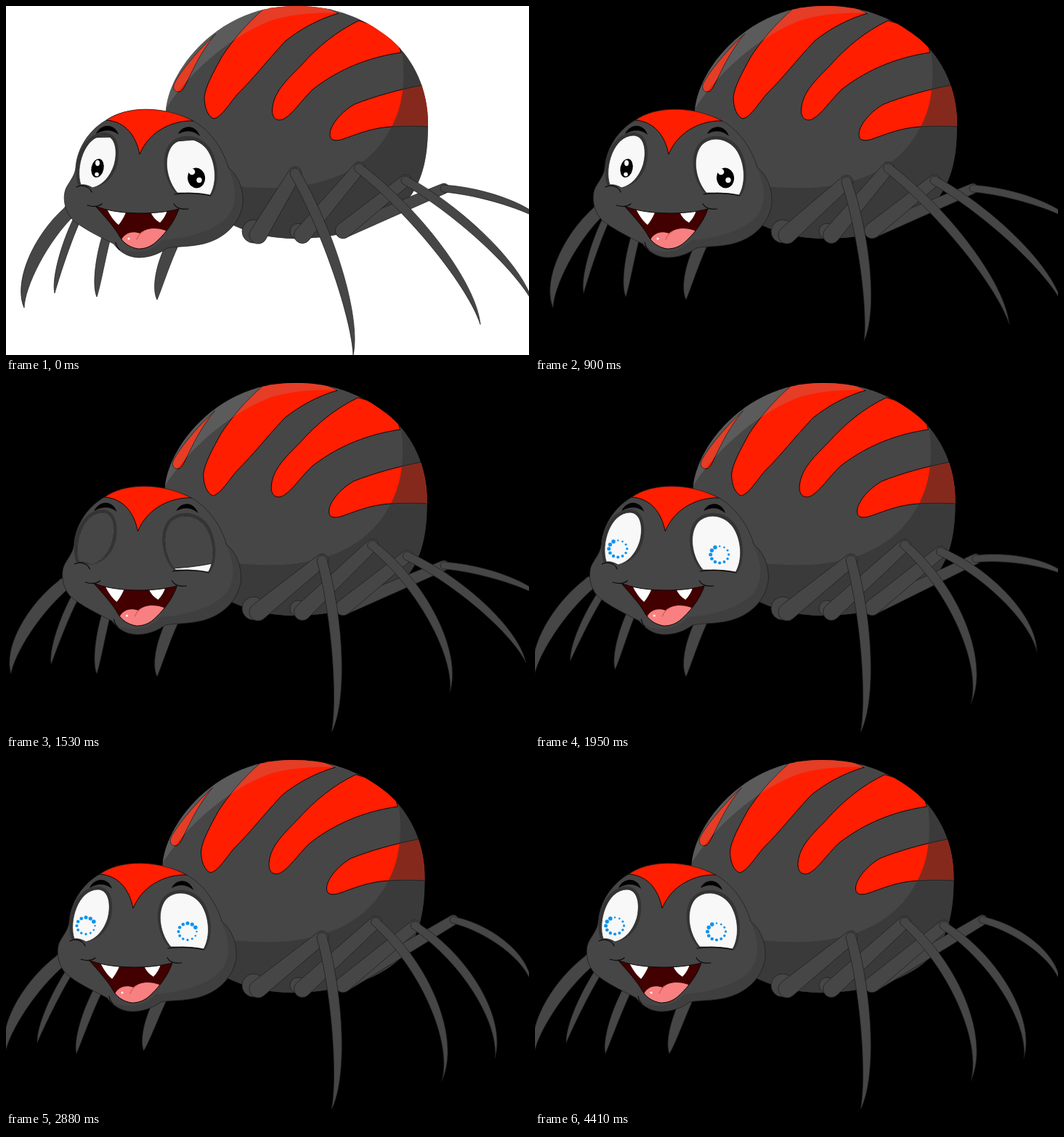
Animation of 720 by 480 pixels, one loop 4.44 s. Source, as an HTML page:

```html
<!DOCTYPE html>
<html lang="en">
<head>
<meta charset="utf-8">
<title>Spider</title>
<style>
html, body { margin: 0; width: 100%; height: 100%; overflow: hidden; background: #000; }
svg { display: block; width: 720px; height: 480px; }
.skin { fill: #464646; }
.ink { stroke: #0a0a0a; stroke-width: 1; stroke-linejoin: round; }
.thin { stroke: #1c1c1c; stroke-width: .7; }
.line { fill: none; stroke: #0a0a0a; stroke-width: 1.2; stroke-linecap: round; }
.red { fill: #ff1e00; }
.shade { fill: #323232; fill-opacity: .59; }
.shine { fill: #999; fill-opacity: .25; }
.rim { fill: #343434; }
.white { fill: #f8f8f8; }
</style>
</head>
<body>
<svg viewBox="0 0 720 480">
  <defs>
    <path id="shell" d="M220 143C224 100 262 45 318 18C345 5 370 0 400 0C450 0 492 15 530 46C562 74 581 115 581 163C581 207 574 243 550 270C518 303 460 320 395 320C350 319 318 306 290 290L225 200Z"/>
    <path id="skull" d="M138 157C165 138 215 136 258 158C283 172 300 200 306 222C322 235 327 255 326 272C322 300 300 320 272 327C250 332 235 330 222 333C210 341 198 346 182 346C165 345 155 336 148 327C130 318 100 303 90 292C80 280 77 260 84 248C90 238 95 232 96 222C98 195 115 170 138 157Z"/>
    <path id="eyeL" d="M103 246C95 222 108 178 136 178C151 179 154 200 149 218C144 234 133 247 119 250C114 247 108 245 103 246Z"/>
    <path id="eyeR" d="M236 257C221 240 216 210 228 193C240 178 265 180 278 199C289 216 291 243 281 260C268 257 252 257 236 257Z"/>
    <path id="mouth" d="M123 275C150 287 205 288 238 279C231 300 215 317 206 325C198 332 190 334 182 334C170 332 162 326 157 318C150 305 138 292 123 275Z"/>
    <clipPath id="inShell"><use href="#shell"/></clipPath>
    <clipPath id="inSkull"><use href="#skull"/></clipPath>
    <clipPath id="inL"><use href="#eyeL"/></clipPath>
    <clipPath id="inR"><use href="#eyeR"/></clipPath>
    <clipPath id="inMouth"><use href="#mouth"/></clipPath>
  </defs>

  <rect id="sky" width="720" height="480"/>

  <g id="body">
    <use href="#shell" class="skin"/>
    <g clip-path="url(#inShell)">
      <g class="red ink">
        <path d="M289 38C265 60 240 90 232 106C227 116 237 122 243 115C252 102 262 70 289 38Z"/>
        <path d="M356 3C330 25 310 50 297 70C285 92 275 110 273 125C273 140 278 152 286 155C296 153 305 138 318 122C345 95 355 80 385 48C405 32 430 18 458 10C430 -4 400 -8 356 3Z"/>
        <path d="M486 20C455 35 430 55 405 83C385 103 370 118 367 138C364 155 374 160 383 155C395 148 405 132 422 115C450 93 489 72 544 64L535 35Z"/>
        <path d="M572 109C540 115 505 125 480 135C462 145 447 163 446 175C445 185 452 186 461 184C480 178 500 168 530 166C550 165 565 165 582 166L590 109Z"/>
      </g>
      <path class="shade" d="M545 62C550 95 547 130 536 155C515 205 470 245 380 250C355 251 330 249 300 247V330H600V62Z"/>
      <path class="shine" d="M218 145C246 98 305 42 368 19C405 9 440 9 460 10V-5H200Z"/>
    </g>
  </g>

  <g id="legs" class="skin thin"></g>

  <g id="head">
    <use href="#skull" class="skin"/>
    <g clip-path="url(#inSkull)">
      <path fill="#323232" fill-opacity=".35" d="M304 220C318 245 320 275 302 293C280 312 245 320 215 322C200 340 175 342 150 332L160 350H330V220Z"/>
      <path class="red ink" d="M138 157C165 136 215 134 258 158C232 157 198 170 184 204C179 179 165 159 138 157Z"/>
    </g>
    <use href="#skull" class="thin" fill="none"/>

    <path class="rim" d="M99 246C90 218 105 173 137 174C155 176 158 200 153 219C148 235 136 248 119 250Z"/>
    <path class="rim" d="M234 258C217 240 212 208 225 190C239 173 268 175 282 197C293 216 294 243 284 260Z"/>
    <use href="#eyeL" class="white"/>
    <use href="#eyeR" class="white"/>

    <g id="pupils">
      <ellipse cx="126" cy="223" rx="8.5" ry="13" transform="rotate(12 126 223)"/>
      <ellipse cx="262" cy="236.500" rx="12" ry="14" transform="rotate(-8 262 236)"/>
      <g class="white">
        <ellipse cx="126" cy="216" rx="3" ry="4"/>
        <circle cx="125" cy="231.500" r="2.800"/>
        <circle cx="256" cy="228" r="4.300"/>
        <circle cx="266" cy="239.500" r="3.700"/>
      </g>
    </g>
    <g id="spinners" fill="#1093ee"></g>

    <g clip-path="url(#inL)"><path id="lidL" class="skin" stroke="#222" d="M90 0L160 -2V-100H90Z"/></g>
    <g clip-path="url(#inR)"><path id="lidR" class="skin" stroke="#222" d="M212 3Q255 3 295 -6V-110H212Z"/></g>
    <g class="thin" fill="none"><use href="#eyeL"/><use href="#eyeR"/></g>

    <path d="M124 176C130 162 149 160 155 177C146 169 134 170 124 176Z"/>
    <path d="M237 176C243 163 261 162 267 179C256 170 247 171 237 176Z"/>

    <use href="#mouth" fill="#420000"/>
    <g clip-path="url(#inMouth)">
      <path fill="#f98080" d="M157 325C163 311 174 309 185 313C192 305 207 304 220 309V340H157Z"/>
      <path class="line" stroke-width=".7" d="M180 321Q183 313 189 310" style="stroke:#d05858"/>
      <circle cx="169" cy="320" r="1.500" fill="#fff"/>
      <path fill="#fff" d="M139 279C143 288 149 296 155 301C159 296 162 291 165 284ZM199 283Q203 293 212 298Q219 291 222 281Z"/>
    </g>
    <use href="#mouth" class="ink" fill="none"/>
    <path class="line" d="M112 274Q125 278 132 272M231 272Q236 281 251 279M97 249C104 245 115 248 118 256M232 259Q256 255 282 261M151 325Q152 331 156 335"/>
  </g>
</svg>
<script>
const LOOP = 4440, STEP = 30, DOTS = 12;
const BLINK = 1560, BLINK_HALF = 330, SPIN = .876;
const $ = id => document.getElementById(id);
const mix = (a, b, u) => a + (b - a) * u;
const ramp = (t, from, to) => Math.min(1, Math.max(0, (t - from) / (to - from)));

function add(tag, parent, attrs = {}) {
  const el = document.createElementNS('http://www.w3.org/2000/svg', tag);
  for (const k in attrs) el.setAttribute(k, attrs[k]);
  return parent.appendChild(el);
}

// Pointed lower limb; curl bows it sideways as a share of its length.
function shin([kx, ky], [fx, fy], w, curl) {
  const dx = fx - kx, dy = fy - ky, len = Math.hypot(dx, dy), h = len * curl;
  const pt = (along, off) => `${kx + dx * along + dy / len * off} ${ky + dy * along - dx / len * off} `;
  return `M${pt(0, w)}C${pt(.35, h + w * 1.1)}${pt(.82, h + w)}${pt(1, 0)}` +
    `C${pt(.82, h - w)}${pt(.35, h - w * 1.1)}${pt(0, -w)}A${w} ${w} 0 0 1 ${pt(0, w)}Z`;
}

// Rounded upper limb from hip to knee.
function thigh([hx, hy], [kx, ky], r, w) {
  const len = Math.hypot(kx - hx, ky - hy), nx = (hy - ky) / len, ny = (kx - hx) / len;
  return `M${hx + nx * r} ${hy + ny * r}L${kx + nx * w} ${ky + ny * w}` +
    `A${w} ${w} 0 0 0 ${kx - nx * w} ${ky - ny * w}L${hx - nx * r} ${hy - ny * r}` +
    `A${r} ${r} 0 0 0 ${hx + nx * r} ${hy + ny * r}Z`;
}

// Each leg takes one step during `time`; knee and foot hold both ends of it.
const legs = [
  { w: 5, hip: [466, 309], time: [1700, 2550], knee: [603, 251, 616, 220], foot: [742, 298, 723, 307], lift: 40, curl: [.09, .17] },
  { w: 6, hip: [464, 309], time: [1380, 2250], knee: [550, 240, 563, 228], foot: [725, 408, 673, 410], lift: 45, curl: [.09, .17] },
  { w: 6.5, hip: [408, 315], joint: 11, time: [960, 1680], knee: [486, 223, 509, 223], foot: [653, 438, 600, 441], lift: 25, curl: [.09, .17] },
  { w: 7, hip: [347, 315], joint: 16, time: [0, 1080], knee: [398, 230, 435, 244], foot: [478, 480, 448, 481], lift: 40, curl: [.075, .075] },
  { w: 9, time: [1050, 1740], knee: [88, 282, 76, 275], foot: [25, 415, -1, 403], lift: 8, curl: [-.14, -.13] },
  { w: 5, time: [1380, 2130], knee: [97, 295, 88, 290], foot: [67, 395, 43, 389], lift: 12, curl: [-.05, -.05] },
  { w: 6, time: [1620, 2250], knee: [138, 318, 127, 316], foot: [125, 400, 97, 404], lift: 8, curl: [-.04, -.05] },
  { w: 8, time: [2400, 3000], knee: [232, 322, 211, 325], foot: [208, 404, 185, 404], lift: 7, curl: [-.07, -.05] },
];
for (const leg of legs) {
  if (leg.joint) add('circle', $('legs'), { cx: leg.hip[0] - 6, cy: leg.hip[1] - 5, r: leg.joint });
  if (leg.hip) leg.upper = add('path', $('legs'));
  leg.lower = add('path', $('legs'));
}

function pose({ w, hip, time, knee, foot, lift, curl, upper, lower }, t) {
  const u = ramp(t, ...time);
  const k = [mix(knee[0], knee[2], u), mix(knee[1], knee[3], u)];
  const f = [mix(foot[0], foot[2], u), mix(foot[1], foot[3], u) - lift * Math.sin(Math.PI * u)];
  if (hip) upper.setAttribute('d', thigh(hip, k, w * 1.3 + 3, w + 2));
  lower.setAttribute('d', shin(k, f, w, mix(...curl, u)));
}

const dots = [];
for (const [cx, cy] of [[119, 228], [259, 236]])
  for (let i = 0; i < DOTS; i++) {
    const a = i / DOTS * 2 * Math.PI;
    dots.push(add('circle', $('spinners'), { cx: cx + 12.5 * Math.sin(a), cy: cy - 11.5 * Math.cos(a) }));
  }

const move = (id, x, y) => $(id).setAttribute('transform', `translate(${x} ${y})`);

function draw(t) {
  $('sky').setAttribute('fill', t < STEP ? '#fff' : '#000');

  const turn = ramp(t, 1050, 2750);
  move('body', -4.5 * turn, 0);
  move('head', -9 * turn, 0);
  for (const leg of legs) pose(leg, t);

  const shut = Math.max(0, 1 - Math.abs(t - BLINK) / BLINK_HALF, .08 - t / 1000);
  move('lidL', 0, 175 + 84 * shut);
  move('lidR', 0, 177 + 83 * shut);

  const loading = t >= BLINK;
  $('pupils').style.display = loading ? 'none' : '';
  $('spinners').style.display = loading ? '' : 'none';
  const lead = Math.round((65 + (t - 2880) * SPIN) / 360 * DOTS);
  dots.forEach((dot, i) => {
    const age = ((lead - i) % DOTS + DOTS) % DOTS;
    dot.setAttribute('r', 2.8 - 1.6 * age / (DOTS - 1));
  });
}

const start = performance.now();
function tick() {
  const t = (performance.now() - start) % LOOP;
  draw(Math.floor(t / STEP) * STEP);
  requestAnimationFrame(tick);
}
tick();
</script>
</body>
</html>
```
